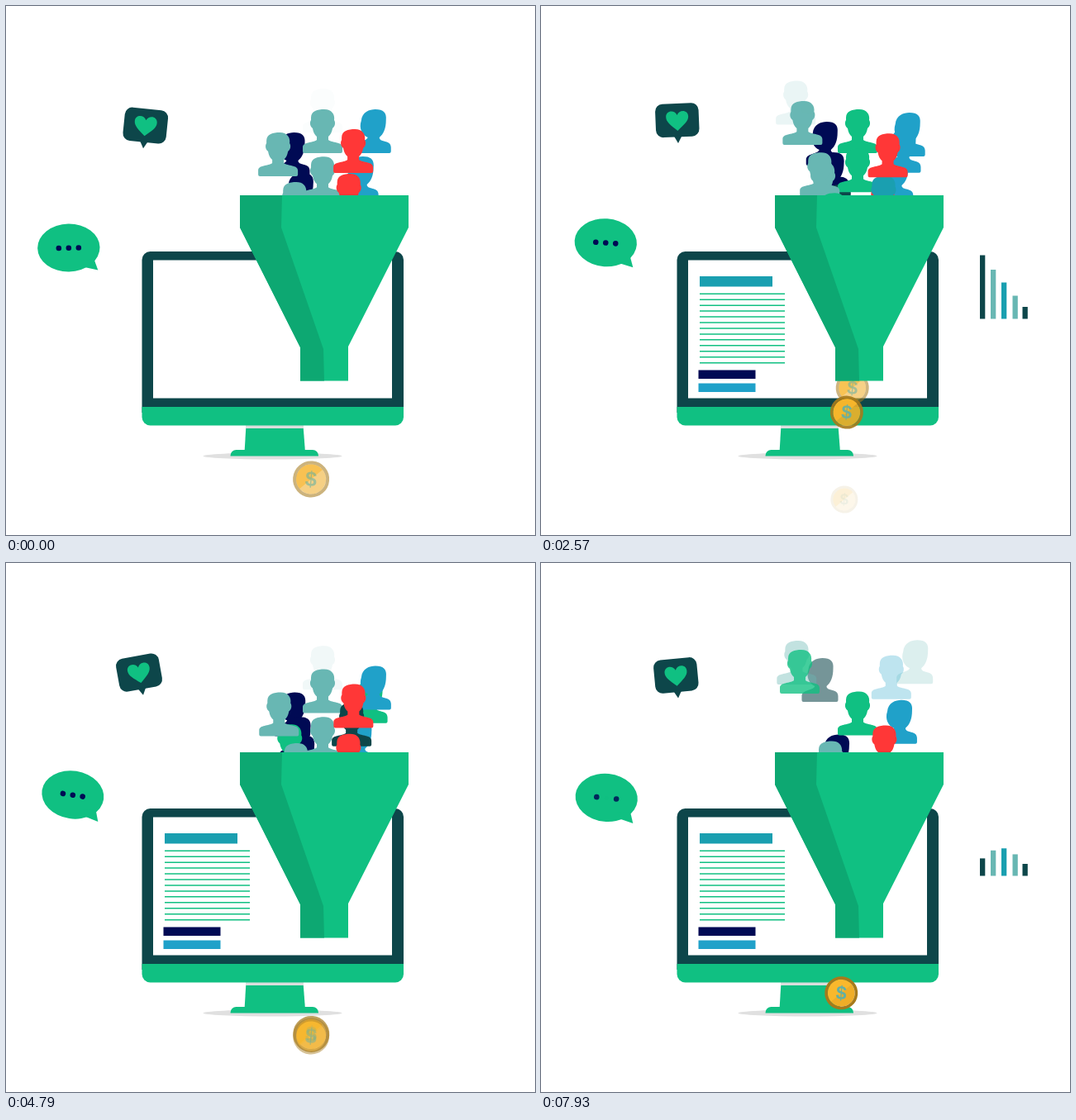
These frames come from a looping animation (640x640 px, 8000 ms). An HTML page with a canvas:

```html
<!DOCTYPE html>
<html lang="en">
<head>
<meta charset="utf-8">
<title>Conversion funnel</title>
<style>
html, body { margin: 0; width: 100%; height: 100%; overflow: hidden; background: #fff; }
canvas { display: block; width: 640px; height: 640px; }
</style>
</head>
<body>
<canvas id="stage" width="640" height="640"></canvas>
<script>
const ctx = document.getElementById('stage').getContext('2d');
const LOOP = 8000;
const green = '#10c082', shade = '#0da872', dark = '#0d464a', navy = '#000a54',
      teal = '#68b7b3', cyan = '#1a9fb0', blue = '#20a1c9', red = '#ff3737';

const clamp = v => Math.max(0, Math.min(1, v));
const ease = v => (1 - Math.cos(Math.PI * clamp(v))) / 2;

function fill(color, path) {
  ctx.fillStyle = color;
  ctx.fill(path);
}
function rect(color, x, y, w, h, radius = 0) {
  ctx.fillStyle = color;
  ctx.beginPath();
  ctx.roundRect(x, y, w, h, radius);
  ctx.fill();
}
function ellipse(color, x, y, rx, ry = rx) {
  ctx.fillStyle = color;
  ctx.beginPath();
  ctx.ellipse(x, y, rx, ry, 0, 0, 2 * Math.PI);
  ctx.fill();
}
function at(x, y, degrees, draw) {
  ctx.save();
  ctx.translate(x, y);
  ctx.rotate(degrees * Math.PI / 180);
  draw();
  ctx.restore();
}

const shortHair = new Path2D('M-14 10C-14 2-6 0 2 0C11 0 15 6 14 13C16 16 15 21 12 23C11 29 9 31 7 33V37C12 41 24 39 24 46V51Q24 53 22 53H-22Q-24 53-24 51V46C-24 39-12 41-7 37V33C-9 31-11 29-12 23C-15 21-16 16-14 13Z');
const longHair = new Path2D('M-14 14C-13 3-4 0 3 0C13 0 17 4 16 13C16 23 13 30 8 34C8 41 22 36 22 46V51Q22 53 20 53H-20Q-22 53-22 51V46C-22 38-9 40-6 34C-13 31-17 23-14 14Z');
const heart = new Path2D('M0 12C-8 5-13.5 1-13.5-5C-13.5-13-3-14 0-7C3-14 13.5-13 13.5-5C13.5 1 8 5 0 12Z');
const funnel = new Path2D('M283 229H487V268L414 412V453.5H356V413L283 268Z');
const funnelShade = new Path2D('M283 229H334L333 268L384 415L385 453.5H356V413L283 268Z');

// Each lane: start point, drift in x per pixel fallen, figure, and departures by colour.
const lanes = [
  { x: 452.5, y: 92, drift: -0.265, shape: longHair, people: [
    [blue, -1749, -957, 180, 807, 1270, 1550, 2916], [green, 3600],
    [blue, 3840, 4930, 6400], [teal, 7750]] },
  { x: 336, y: 108, drift: 0.21, shape: longHair, people: [
    [navy, -1977, -1218, 513, 987, 1565], [dark, 330],
    [navy, 3520, 3066, 2700, 5854, 5250], [dark, 7477]] },
  { x: 383, y: 100, drift: 0, shape: shortHair, people: [
    [teal, -849, -1710, -21], [green, 1721, 1002],
    [teal, 3880, 3024, 4715], [green, 6600]] },
  { x: 424, y: 110, drift: -0.1, shape: shortHair, people: [
    [red, -1131, -1986, 321], [cyan, 540], [red, 1355],
    [dark, 3350], [red, 3700, 2739, 5120, 6055], [blue, 7700]] },
  { x: 308, y: 90, drift: 0.335, shape: shortHair, people: [
    [teal, -2235, -1374, 717, 876, 1753], [green, 45, 2844],
    [teal, 3370, 2460, 5450, 5650, 7609], [green, 7306]] }
];

function drawPeople(t) {
  ctx.save();
  ctx.beginPath();
  ctx.rect(0, 0, 640, 229);
  ctx.clip();
  for (const { x, y, drift, shape, people } of lanes) {
    for (const [color, ...starts] of people) {
      for (const start of starts) {
        const age = t - start;
        if (age <= 0 || age >= 3000) continue;
        const fallen = ease(age / 3000) * (235 - y);
        ctx.globalAlpha = clamp(age / 800);
        at(x + drift * fallen, y + fallen, 0, () => fill(color, shape));
      }
    }
  }
  ctx.restore();
}

const coinKinds = {
  large: { r: 22, drift: -0.083, end: 572.5, time: 1300, fade: 900, gone: 1850, x: 380 },
  medium: { r: 20, drift: -0.23, end: 560, time: 1400, fade: 920, gone: 1850, x: 381.5 },
  small: { r: 16.5, drift: -0.097, end: 597, time: 1500, fade: 920, gone: 2090, x: 382 }
};
// Later departures come first so that the leading coin lies on top.
const coins = [
  ['medium', 7080], ['large', 5500], ['small', 5400], ['large', 3607], ['large', 3373],
  ['medium', 2185], ['medium', 1938], ['small', 594], ['large', -1310]
];

function drawCoin(r) {
  const rim = r * 0.18, inner = r - rim;
  ellipse('#efad27', 0, 0, inner);
  ctx.fillStyle = '#f9b82c';
  ctx.beginPath();
  ctx.arc(0, 0, inner, 0.75 * Math.PI, 1.75 * Math.PI);
  ctx.fill();
  ctx.strokeStyle = '#a67a1b';
  ctx.lineWidth = rim;
  ctx.beginPath();
  ctx.arc(0, 0, r - rim / 2, 0, 2 * Math.PI);
  ctx.stroke();
  ctx.fillStyle = '#63b0a4';
  ctx.font = `bold ${r * 1.15}px "Liberation Sans", sans-serif`;
  ctx.textAlign = 'center';
  ctx.textBaseline = 'middle';
  ctx.fillText('$', 0, r * 0.06);
}

function drawCoins(t) {
  for (const [kind, start] of coins) {
    const c = coinKinds[kind], age = t - start;
    if (age <= 0 || age >= c.gone) continue;
    const fallen = ease(age / c.time) * (c.end - 441);
    ctx.globalAlpha = Math.min(clamp(age / 700), clamp((c.gone - age) / (c.gone - c.fade)));
    at(c.x + c.drift * fallen, 441 + fallen, 5, () => drawCoin(c.r));
  }
  ctx.globalAlpha = 1;
}

function drawMonitor(t) {
  ellipse('#e0e0e0', 322.5, 544.5, 84, 4);
  fill(green, new Path2D('M290.5 507H359.5L362 540H288.5Z'));
  rect('#dadddc', 290, 507, 70, 4);
  rect(green, 271.5, 537, 106.5, 7.5, [7, 7, 0, 0]);
  rect(dark, 164.5, 297, 316.5, 195, [10, 10, 0, 0]);
  rect(green, 164.5, 485, 316.5, 22.5, [0, 0, 10, 10]);
  rect('#fff', 178, 307.5, 289, 167);

  const grow = start => ease((t - start) / 1000);
  rect(cyan, 192, 327, 88 * grow(560), 12.5);
  for (let i = 0; i < 13; i++) rect(green, 192, 347.5 + i * 6.95, 103 * grow(1100), 1.5);
  rect(navy, 190.5, 440.5, 69 * grow(450), 10.5);
  rect(blue, 190.5, 456.5, 69 * grow(670), 10.5);
}

const bars = [[531, 77, dark], [544, 59.5, teal], [557, 44, cyan], [570.5, 28, teal], [582.5, 14.5, dark]];

function drawChart(t) {
  const time = t % 6940;
  bars.forEach(([x, height, color], i) => {
    const delay = (4 - i) * 160;
    const size = ease((time - delay) / 1000) - ease((time - 3160 - delay) / 1000);
    if (size > 0.005) rect(color, x, 378.5 - height * size, 6.3, height * size);
  });
}

const blinks = [400, 1260, 2050, 3100, 4212, 5056, 6050, 7000, 7780];

function drawBubbles(t) {
  const sway = Math.cos(2 * Math.PI * (t - 5600) / 12000);

  at(166, 165.8 - 6.5 * sway, -2.5 - 8.5 * sway, () => {
    rect(dark, -26.3, -48, 52.5, 40.5, 9);
    fill(dark, new Path2D('M-5-9L0 0L5-9Z'));
    ctx.translate(0, -27);
    fill(green, heart);
  });

  at(111.3, 316.1 - 3.4 * sway, 4 + 5.1 * sway, () => {
    ellipse(green, -35, -27.6, 37.7, 29);
    fill(green, new Path2D('M0 0L-4.5-13L-20-12L-15-3.5Z'));
    for (let i = 0; i < 3; i++) {
      const gap = Math.min(...blinks.map(b => Math.abs(t - b - i * 150)));
      ctx.globalAlpha = clamp(gap / 180);
      ellipse(navy, -47 + i * 12, -27.3, 3.3);
    }
  });
}

function frame() {
  const t = performance.now() % LOOP;
  ctx.fillStyle = '#fff';
  ctx.fillRect(0, 0, 640, 640);
  drawMonitor(t);
  drawCoins(t);
  drawPeople(t);
  fill(green, funnel);
  fill(shade, funnelShade);
  drawChart(t);
  drawBubbles(t);
  requestAnimationFrame(frame);
}
frame();
</script>
</body>
</html>
```
